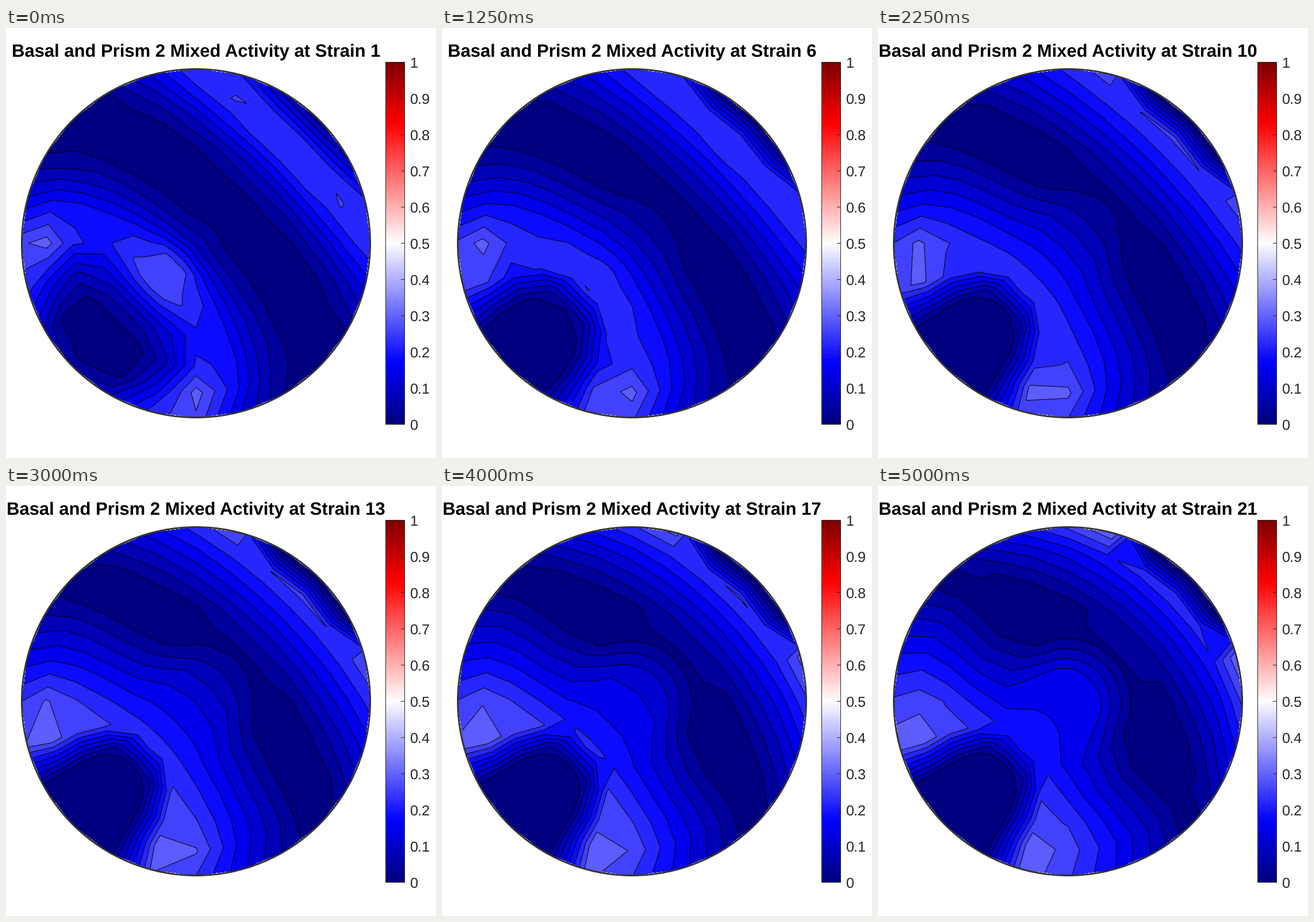
A matplotlib script that plays this animation: 748x748 px, repeating every 5250 ms.

```python
import numpy as np
import matplotlib.pyplot as plt
from matplotlib.animation import FuncAnimation
from matplotlib.colors import LinearSegmentedColormap
from matplotlib.patches import Circle, Rectangle

SIZE, DPI = 748, 100
FRAMES, INTERVAL = 21, 250
CX, CY, R = 330, 374, 303
STEP = 0.036          # activity between neighbouring contours
PX = 72 / DPI         # points per pixel
GREY = "#262626"

plt.rcParams["font.family"] = "Liberation Sans"
plt.rcParams["text.hinting"] = "none"

cmap = LinearSegmentedColormap.from_list("activity", [
    (0, (0, 0, .5)), (1 / 6, (0, 0, 1)), (.5, (1, 1, 1)),
    (5 / 6, (1, 0, 0)), (1, (.5, 0, 0))], N=256)

# Equal-area polar grid, 15 degrees apart both ways
tilt = np.radians(np.arange(0, 91, 15))[:, None]
spin = np.radians(15 * np.arange(25))[None, :]
radius = R * np.sqrt(2) * np.sin(tilt / 2)
X = CX + radius * np.cos(spin + np.pi / 4)
Y = CY - radius * np.sin(spin + np.pi / 4)

# Cosine of the angle to the crystal axis, which lies towards the lower left
AXIS = np.radians(69)
q = np.cos(tilt) * np.cos(AXIS) - np.sin(tilt) * np.cos(spin) * np.sin(AXIS)
aq = np.abs(q)

# Positions folded onto the upper left half; the field is mirror symmetric
fold = np.minimum(spin, 2 * np.pi - spin) + np.pi / 4
FX, FY = CX + radius * np.cos(fold), CY - radius * np.sin(fold)


def spot(x, y, width):
    return np.exp(-((FX - x) ** 2 + (FY - y) ** 2) / width ** 2)


HOT, COOL, CORE = spot(65, 400, 45), spot(145, 400, 60), spot(283, 410, 45)
CENTRE = np.exp(-(tilt / np.radians(27)) ** 4)

# Two slip responses: a soft early one and a late one with a sharp dark pole
EARLY = 7.2 * (2 * aq * np.sqrt(np.clip(1 - q ** 2, 0, 1))) ** (2 + 2 * aq)
POLE = 1 / (1 + np.exp((aq - .886) / .0035))


def activity(t):
    """Field on the grid, in contour steps."""
    s = t / (FRAMES - 1)
    ease = 1 - (1 - s) ** 3
    g = s ** 2
    late = np.maximum(10.6 * aq - 1 - 1.2 * g * np.sin(3 * tilt), 0)
    late = late * POLE * (1 - .25 * g * (q < 0) * np.cos(tilt) ** .2)
    z = EARLY * (1 - ease) + late * ease
    z = z + 2.4 * (1 - g) * HOT + (1 - ease) * (1.6 * CORE - 2 * COOL)
    z = z + s * CENTRE * (4.2 + 1.6 * q - z)
    return np.clip(z, 0, 8.9)


fig = plt.figure(figsize=(SIZE / DPI, SIZE / DPI), dpi=DPI, facecolor="white")
ax = fig.add_axes([0, 0, 1, 1])
ax.axis("off")


def draw_colorbar():
    x0, x1, top, bottom = 660, 693, 59, 689
    ramp = np.linspace(1, 0, 128)[:, None]
    ax.imshow(ramp, cmap=cmap, vmin=0, vmax=1, extent=(x0, x1, bottom, top),
              aspect="auto", interpolation="nearest")
    ax.add_patch(Rectangle((x0, top), x1 - x0, bottom - top, fill=False,
                           ec=GREY, lw=PX))
    for i in range(11):
        y = bottom - (bottom - top) * i / 10
        ax.plot([x1 - 6, x1], [y, y], color=GREY, lw=PX)
        ax.text(702, y + 9.5, f"{i / 10:g}", size=25.2 * PX, color=GREY,
                va="baseline")


draw_colorbar()
ax.add_patch(Circle((CX, CY), R, fill=False, ec="#333333", lw=3 * PX, zorder=5))
title = ax.text(CX, 49, "", size=31 * PX, weight="bold", ha="center",
                va="baseline")
ax.set_xlim(-.5, SIZE - .5)
ax.set_ylim(SIZE - .5, -.5)
ax.set_autoscale_on(False)

LINES = np.arange(1, 10)
BANDS = [-9, *LINES, 99]
COLORS = [cmap(i * STEP) for i in range(10)]
drawn = []


def update(t):
    while drawn:
        drawn.pop().remove()
    z = activity(t)
    drawn.append(ax.contourf(X, Y, z, levels=BANDS, colors=COLORS, zorder=1))
    drawn.append(ax.contour(X, Y, z, levels=LINES[:-1], colors="black",
                            linewidths=PX, zorder=2))
    title.set_text(f"Basal and Prism 2 Mixed Activity at Strain {t + 1}")
    return [title]


anim = FuncAnimation(fig, update, frames=FRAMES, interval=INTERVAL,
                     init_func=lambda: [title], repeat=True, repeat_delay=0,
                     blit=False)
plt.show()
```
